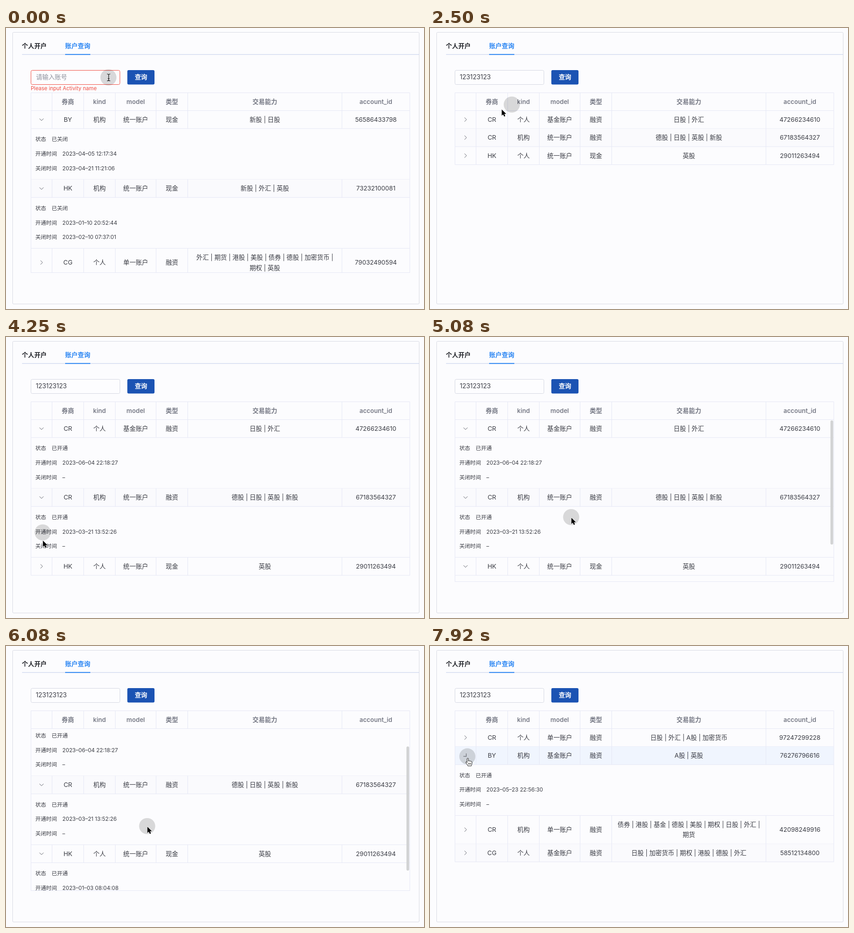
These frames come from a looping animation (912 by 614 pixels, 8000 ms). An HTML page:

```html
<!DOCTYPE html>
<html lang="zh-CN">
<head>
<meta charset="utf-8">
<style>
  html, body { margin: 0; width: 100%; height: 100%; overflow: hidden; background: #fcfcfe; }
  svg { display: block; font-family: Inter, "Noto Sans CJK SC", "Noto Sans CJK", sans-serif; }
</style>
</head>
<body>
<svg id="stage" width="912" height="614" viewBox="0 0 912 614"></svg>
<script>
const LOOP = 8000, STEP = 1000 / 12;
const BODY_TOP = 180.4, BODY_HEIGHT = 354, ROW = 39.4, TALL_ROW = 62, DETAIL = 111.1;
const INK = '#393b43', GRID = '#e5e7f5', RED = '#f04c40';
const EDGES = [54.5, 100.5, 169.5, 238.5, 327.5, 396.5, 733, 881];
const CENTERS = EDGES.slice(1).map((x, i) => (x + EDGES[i]) / 2);
const HEADERS = ['', '券商', 'kind', 'model', '类型', '交易能力', 'account_id'];

// open: step at which the row unfolds
const row = (cells, open = Infinity, start = '', end = '–') => ({ cells: cells.split(','), open, start, end });
const tables = [
  { from: 0, rows: [
    row('BY,机构,统一账户,现金,新股 | 日股,56586433798', -9, '2023–04–05 12:17:34', '2023–04–21 11:21:06'),
    row('HK,机构,统一账户,现金,新股 | 外汇 | 英股,73232100081', -9, '2023–01–10 20:52:44', '2023–02–10 07:37:01'),
    row('CG,个人,单一账户,融资,外汇 | 期货 | 港股 | 美股 | 债券 | 德股 | 加密货币 |/期权 | 英股,79032490594')
  ] },
  { from: 25, rows: [
    row('CR,个人,基金账户,融资,日股 | 外汇,47266234610', 36, '2023–06–04 22:18:27'),
    row('CR,机构,统一账户,融资,德股 | 日股 | 英股 | 新股,67183564327', 46, '2023–03–21 13:52:26'),
    row('HK,个人,统一账户,现金,英股,29011263494', 56, '2023–01–03 08:04:08')
  ] },
  { from: 86, rows: [
    row('CR,个人,单一账户,融资,日股 | 外汇 | A股 | 加密货币,97247299228'),
    row('BY,机构,基金账户,融资,A股 | 英股,76276796616', 94, '2023–05–23 22:56:30'),
    row('CR,机构,单一账户,融资,债券 | 港股 | 基金 | 德股 | 美股 | 期权 | 日股 | 外汇 |/期货,42098249916'),
    row('CG,个人,基金账户,融资,日股 | 加密货币 | 期权 | 港股 | 德股 | 外汇,58512134800')
  ] }
];

const typedAt = [5, 8, 11, 13, 14, 16, 18, 19, 21];
const pointerPath = [
  [0, 223.5, 108], [17, 223.5, 108], [19, 240, 106], [20, 262.5, 103.5], [21, 280, 106], [22, 288, 107],
  [25, 287, 107], [28, 220, 150], [32, 92, 203], [33.5, 82, 204], [37, 82, 204], [38, 81, 255], [39, 80, 314],
  [40, 80, 316], [42, 80, 344], [48, 80, 344], [50, 80, 420], [53, 80, 490], [55, 79, 497], [57, 79, 497],
  [60, 308, 393.5], [75, 308, 393.5], [78.5, 292, 75], [80, 288, 81], [81, 284.5, 102.5], [85, 284.5, 102.5],
  [88, 200, 150], [91, 100, 232], [92.5, 81.5, 239.5], [94, 81.5, 239.5], [95, 81.5, 245]
];
const scrollPath = [[61, 0], [63, 50], [65, 90], [66, 97], [70, 97], [71, 85], [73, 47.3], [76, 0]];

function follow(path, n) {
  const next = path.findIndex(key => key[0] > n);
  if (next < 0) return path[path.length - 1].slice(1);
  if (next === 0) return path[0].slice(1);
  const a = path[next - 1], b = path[next], k = (n - a[0]) / (b[0] - a[0]);
  return a.slice(1).map((v, i) => v + (b[i + 1] - v) * k);
}

const rect = (x, y, w, h, fill, extra = '') => `<rect x="${x}" y="${y}" width="${w}" height="${h}" fill="${fill}" ${extra}/>`;
const line = (x1, y1, x2, y2, color = GRID) => `<path d="M${x1} ${y1}L${x2} ${y2}" stroke="${color}"/>`;
// y is the vertical middle of the text
const text = (s, x, y, { size = 13.6, color = INK, weight = 400, anchor = 'start' } = {}) =>
  `<text x="${x}" y="${y + size * 0.36}" font-size="${size}" fill="${color}" font-weight="${weight}" text-anchor="${anchor}">${s}</text>`;
const centered = (s, x, y, style) => text(s, x, y, { anchor: 'middle', ...style });

const measure = document.createElement('canvas').getContext('2d');
function textWidth(s, size) {
  measure.font = `${size}px Inter, sans-serif`;
  return measure.measureText(s).width;
}

function layout(rows, n, scroll) {
  let y = BODY_TOP - scroll;
  return rows.map((r, i) => {
    const height = r.cells[4].includes('/') ? TALL_ROW : ROW;
    const open = n >= r.open;
    const item = { ...r, y, height, isOpen: open, striped: i % 2 === 1 };
    y += height + (open ? DETAIL : 0);
    item.bottom = y;
    return item;
  });
}

function chevron(y, progress) {
  const k = Math.min(1, Math.max(0, progress));
  const angle = 90 * k * k * (3 - 2 * k);
  return `<path d="M-2.2 -4.4L2.3 0L-2.2 4.4" transform="translate(77.5 ${y}) rotate(${angle})" fill="none" stroke="#5c5f69"/>`;
}

function drawRow(r, n, hovered) {
  const mid = r.y + r.height / 2, end = r.y + r.height;
  let out = '';
  if (hovered || r.striped) out += rect(54.5, r.y, 826.5, r.height, hovered ? '#f0f5fe' : '#fafafd');
  out += EDGES.map(x => line(x, r.y, x, end)).join('') + line(54.5, end, 881, end);
  out += chevron(mid, (n - r.open) / 2);
  r.cells.forEach((cell, i) => {
    const lines = cell.split('/');
    lines.forEach((s, j) => {
      out += centered(s, CENTERS[i + 1], mid + (j - (lines.length - 1) / 2) * 22.6, { size: i === 5 ? 13.5 : 13.6 });
    });
  });
  if (r.isOpen) {
    const detail = { size: 11.8 };
    out += text('状态', 64, end + 23.3, detail) + text(r.end === '–' ? '已开通' : '已关闭', 99.5, end + 23.3, detail)
      + text('开通时间', 64, end + 55, detail) + text(r.start, 123, end + 55, detail)
      + text('关闭时间', 64, end + 86.5, detail) + text(r.end, 123, end + 86.5, detail)
      + line(54.5, end, 54.5, r.bottom) + line(881, end, 881, r.bottom) + line(54.5, r.bottom, 881, r.bottom);
  }
  return out;
}

function drawTable(rows, n, scroll, pointer) {
  const [px, py] = pointer;
  const contentHeight = rows[rows.length - 1].bottom + scroll - BODY_TOP;
  const overBody = px > 54 && px < 881 && py > BODY_TOP && py < BODY_TOP + BODY_HEIGHT;
  let out = '<g clip-path="url(#body)">';
  for (const r of rows) out += drawRow(r, n, overBody && py > r.y && py < r.y + r.height);
  out += '</g>';
  if (contentHeight > BODY_HEIGHT) {
    out += line(54.5, 534.5, 881, 534.5);
    const ratio = BODY_HEIGHT / contentHeight;
    if (overBody) out += rect(873.7, 182.3 + scroll * ratio, 6, (BODY_HEIGHT - 8) * ratio, '#d2d3d4', 'rx="3"');
  }
  out += line(54.5, 141.5, 881, 141.5) + line(54.5, 180.5, 881, 180.5);
  out += EDGES.map(x => line(x, 141.5, x, 180.5)).join('');
  HEADERS.forEach((s, i) => {
    out += centered(s, CENTERS[i], 160.8, { size: 13.5, color: '#777a86', weight: 600 });
  });
  return out;
}

function drawForm(n, overInput, overButton) {
  const value = '123123123'.slice(0, typedAt.filter(at => n >= at).length);
  const size = 13.8, focused = n < 23;
  let out = rect(54.5, 92.5, 194, 31, '#fdfdff', `rx="3" stroke="${focused ? RED : '#d4d7e1'}"`);
  out += value ? text(value, 65, 107.5, { size }) : text('请输入账号', 65.5, 107.5, { color: '#8e919c' });
  if (value && focused) {
    const x = 65.5 + textWidth(value, size);
    out += line(x, 100, x, 115, '#333');
  }
  if (value && n >= 6 && (focused || overInput))
    out += '<path d="M226 107.5a5.5 5.5 0 1 0 11 0a5.5 5.5 0 1 0 -11 0M229.5 105.5l4 4m0 -4l-4 4" fill="none" stroke="#82858f"/>';
  if (focused) out += text('Please input Activity name', 54, 131.5, { size: 11.5, color: RED });
  out += rect(264.7, 92, 59.3, 31.6, overButton ? '#1a488d' : '#1b53b3', 'rx="3"');
  return out + centered('查询', 294.5, 107.5, { color: '#fff', weight: 600 });
}

const cursors = {
  arrow: '<path d="M.5 1.5v13.6l3.1-2.9 2.2 4.9 2.4-1.1-2.1-4.7h4.2z" fill="#000" stroke="#fff" stroke-width="1.1" paint-order="stroke"/>',
  beam: '<path d="M-3-7.5Q.5-7.5 .5-5.5V5.5Q.5 7.5-3 7.5M4-7.5Q.5-7.5 .5-5.5M4 7.5Q.5 7.5 .5 5.5M-1.5 2.5h4" fill="none" stroke="#111" stroke-width="1.2"/>',
  hand: '<path transform="translate(1 .5)" d="M-1.6 9.5V1.2a1.5 1.5 0 0 1 3 0V6c.3-1 2.5-1 2.8.3.6-.9 2.5-.6 2.6.6.8-.7 2.3-.2 2.3 1.2V11c0 2.5-1.2 3-1.4 5.5H0C-.4 14.5-2.6 12-4.2 9.6-5.4 8-3.4 6.9-2.5 8.2ZM1.4 10v3.5M3.8 10v3.5M6.2 10v3.5" fill="#fff" stroke="#111"/>'
};

function drawPointer(n, [x, y], kind) {
  if (n >= 1 && n < 16) return '';
  const [cx, cy] = follow(pointerPath, n - 0.7);
  return `<circle cx="${cx}" cy="${cy}" r="17.6" fill="#000" fill-opacity=".145"/><g transform="translate(${x} ${y})">${cursors[kind]}</g>`;
}

function draw(n) {
  const pointer = follow(pointerPath, n), [x, y] = pointer;
  const [scroll] = follow(scrollPath, n);
  const table = tables.filter(t => n >= t.from).pop();
  const rows = layout(table.rows, n, scroll);
  const inForm = y > 92 && y < 124;
  const overInput = inForm && x > 54 && x < 249;
  const overButton = inForm && x > 265 && x < 324;
  const overChevron = rows.some(r => Math.abs(x - 77.5) < 10 && Math.abs(y - r.y - r.height / 2) < 10);
  const kind = overInput ? 'beam' : overButton || overChevron ? 'hand' : 'arrow';
  return `<clipPath id="body">${rect(54, BODY_TOP, 828, BODY_HEIGHT + 0.6, '#000')}</clipPath>`
    + rect(14.5, 9.5, 887, 593.5, '#fcfcfe', 'rx="2" stroke="#d7d9e2"')
    + rect(35, 57, 866.5, 1.6, '#d6ddf1') + rect(129, 56.8, 55, 2, '#2b86f3')
    + text('个人开户', 34.5, 39, { color: '#22242a', weight: 600 })
    + text('账户查询', 129, 39, { size: 13.75, color: '#2b86f3', weight: 600 })
    + drawForm(n, overInput, overButton)
    + drawTable(rows, n, scroll, pointer)
    + drawPointer(n, pointer, kind);
}

const stage = document.getElementById('stage');
const began = performance.now();
let shown = -1;
function tick() {
  const n = Math.floor(((performance.now() - began) % LOOP + 5) / STEP) % 96;
  if (n !== shown) stage.innerHTML = draw(shown = n);
  requestAnimationFrame(tick);
}
tick();
</script>
</body>
</html>
```
